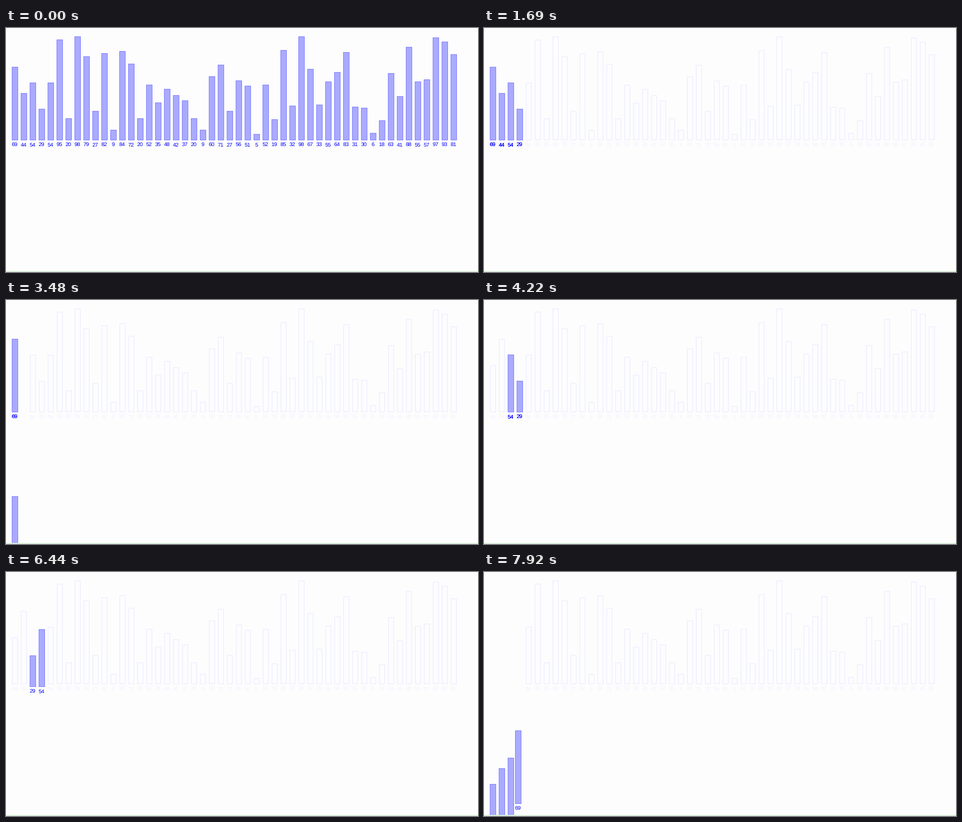
A matplotlib script that plays this animation: 896x465 px, repeating every 8000 ms.

```python
import math
import matplotlib.pyplot as plt
from matplotlib.animation import FuncAnimation
from matplotlib.collections import PolyCollection
from matplotlib.lines import Line2D

plt.rcParams["text.hinting"] = "none"

W, H, FLOOR, DPI = 896, 465, 463, 100
PX = 72 / DPI
INTERVAL, LOOP = 20, 8000
START, TICK = 500, 148.4      # first change and time between pictures, ms
STEP = 2.47                   # ticks from one action to the next
LAG = 0.28                    # extra ticks once one half of a merge is used up
MOVE = 2.44                   # ticks a bar needs to travel

VALUES = [69, 44, 54, 29, 54, 95, 20, 98, 79, 27, 82, 9, 84, 72, 20, 52, 35,
          48, 42, 37, 20, 9, 60, 71, 27, 56, 51, 5, 52, 19, 85, 32, 98, 67,
          33, 55, 64, 83, 31, 30, 6, 18, 63, 41, 88, 55, 57, 97, 93, 81]
N = len(VALUES)

BACK, BLUE, PALE = "#fdfdfd", "#0000ff", "#f2f2ff"

slots = list(range(N))            # which bar stands in each slot
focus = []                        # (tick, first slot, end slot)
moves = [[] for _ in VALUES]      # per bar: (tick, slot, row)


def merge(lo, mid, hi, clock):
    focus.append((clock, lo, hi))
    left, right, run = slots[lo:mid], slots[mid:hi], []
    lagged = False
    while left or right:
        if not (left and right) and not lagged:
            clock += LAG
            lagged = True
        from_left = left and (not right or VALUES[left[0]] <= VALUES[right[0]])
        bar = (left if from_left else right).pop(0)
        moves[bar].append((clock, lo + len(run), 1))
        run.append(bar)
        clock += STEP
    for slot, bar in enumerate(run, lo):
        moves[bar].append((clock, slot, 0))
    slots[lo:hi] = run
    return clock + STEP


def merge_sort(lo, hi, clock):
    focus.append((clock, lo, hi))
    clock += STEP
    if hi - lo == 1:
        return clock
    mid = (lo + hi + 1) // 2
    clock = merge_sort(lo, mid, clock)
    clock = merge_sort(mid, hi, clock)
    return merge(lo, mid, hi, clock)


merge_sort(0, N, -STEP)


def place(bar, tick):
    """Slot, row and whether the bar is on its way."""
    slot, row, moving = bar, 0, False
    for start, dest, dest_row in moves[bar]:
        if start >= tick:
            break
        p = min((tick - start) / MOVE, 1)
        slot += (dest - slot) * p
        row += (dest_row - row) * p
        moving = p < 1
    return slot, row, moving


def box(x, y, value, inset=0):
    left, right = x + 0.5 + inset, x + 11.5 - inset
    top, bottom = y - 2 * value - 0.5 + inset, y + 0.5 - inset
    return [(left, top), (right, top), (right, bottom), (left, bottom)]


fig = plt.figure(figsize=(W / DPI, H / DPI), dpi=DPI, facecolor=BACK)
ax = fig.add_axes([0, 1 - FLOOR / H, 1, FLOOR / H])
ax.set_xlim(0, W)
ax.set_ylim(FLOOR, 0)
ax.axis("off")
edge = 1 - 464 / H
fig.add_artist(Line2D([0, 1], [edge, edge], color="#d3edd3", lw=1.6 * PX))


def make_bars(fill, line, width):
    bars = PolyCollection([], facecolors=fill, edgecolors=line,
                          linewidths=width * PX, snap=False)
    ax.add_collection(bars, autolim=False)
    return bars


def make_labels():
    return [ax.text(0, 0, str(v), family="Liberation Sans", size=10.5 * PX,
                    ha="center", va="baseline", color=BLUE, clip_on=True)
            for v in VALUES]


pale = make_bars("#fdfdff", PALE, 2)
bright = make_bars("#aaaaff", "#8080ff", 1)
labels = make_labels()
heavy = make_labels()   # second coat for highlighted labels at rest


def draw(i):
    tick = math.floor((i * INTERVAL + INTERVAL / 2 - START) / TICK)
    # the opening picture precedes the first split
    _, lo, hi = [f for f in focus if f[0] <= max(tick, -STEP)][-1]
    lit, dim = [], []
    for b, value in enumerate(VALUES):
        slot, row, moving = place(b, tick)
        x, y = round(11 + 17 * slot), round(213 + 250 * row)
        on = lo <= round(slot) < hi
        if on:
            lit.append(box(x, y, value))
        else:
            dim.append(box(x, y, value, 0.5))
        labels[b].set_color(BLUE if on else PALE)
        labels[b].set_visible(row < 1)
        heavy[b].set_visible(on and tick >= 0 and row < 1 and not moving)
        for label in (labels[b], heavy[b]):
            label.set_position((x + 5.5, y + 13))
    bright.set_verts(lit)
    pale.set_verts(dim)
    return [pale, bright, *labels, *heavy]


anim = FuncAnimation(fig, draw, frames=LOOP // INTERVAL, interval=INTERVAL,
                     repeat=True, repeat_delay=0, blit=False)
plt.show()
```
